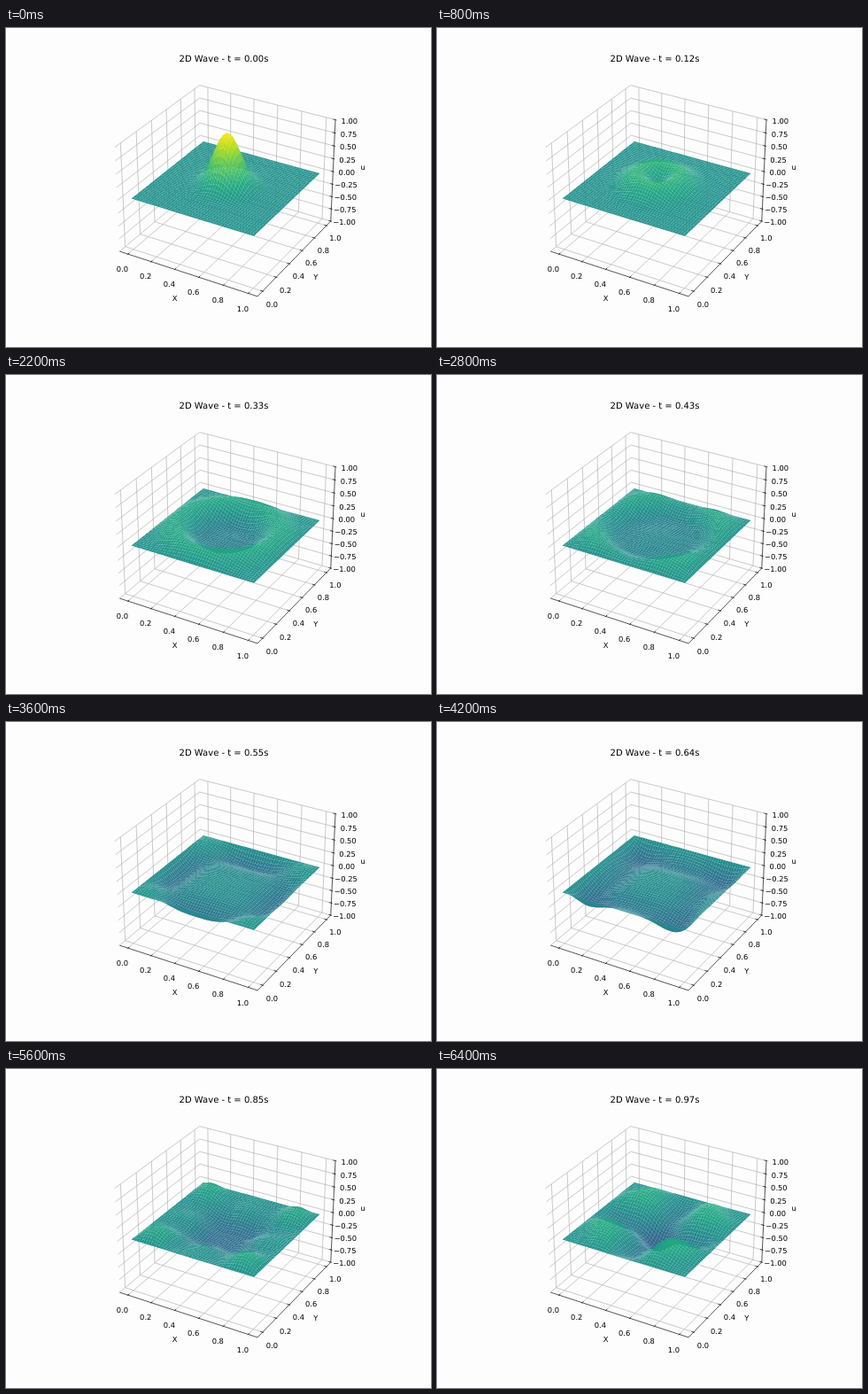
Write an HTML page with a canvas that moves like this. It is 480 by 360 pixels and loops after 6.6 s.

```html
<!DOCTYPE html>
<html lang="en">
<head>
<meta charset="utf-8">
<title>2D Wave</title>
<style>
  html, body { margin: 0; width: 100%; height: 100%; overflow: hidden; background: #fdfdfd; }
  svg, canvas { position: absolute; left: 0; top: 0; width: 480px; height: 360px; }
  text {
    font: 8.333px "DejaVu Sans", sans-serif;
    text-anchor: middle;
    text-rendering: geometricPrecision;
  }
  #title { font-size: 10px; }
  .grid { stroke: #b0b0b0; }
  .axis { stroke: #000; }
  path { fill: none; stroke-width: .667; }
</style>
</head>
<body>
<svg viewBox="0 0 480 360"><text id="title" x="246" y="38.2"></text></svg>
<canvas width="480" height="360"></canvas>
<script>
const FRAME_MS = 200, FRAMES = 33, DT = 0.0304;
const CELLS = 49, SIGMA = 0.1;
const HALF = 0.59524, HEIGHT = 0.44643, SPAN = 1.03896;

const svg = document.querySelector('svg');
const title = document.getElementById('title');
const ctx = document.querySelector('canvas').getContext('2d');

// Perspective camera: elevation 30, azimuth -60, distance 10
function project([x, y, z]) {
  const k = 1498.4 / (10 - 0.43301 * x + 0.75 * y - 0.5 * z);
  return [
    249.75 + k * (0.86603 * x + 0.5 * y),
    178.05 - k * (-0.25 * x + 0.43301 * y + 0.86603 * z)
  ];
}
const toBox = v => (v - 0.5) * SPAN;

function add(tag, attrs, text = '') {
  const el = document.createElementNS('http://www.w3.org/2000/svg', tag);
  for (const name in attrs) el.setAttribute(name, attrs[name]);
  el.textContent = text;
  svg.appendChild(el);
}
function line(cls, ...points) {
  const d = 'M' + points.map(p => project(p).map(v => v.toFixed(2)).join()).join('L');
  add('path', { class: cls, d });
}
function label(text, point, drop) {
  const [x, y] = project(point);
  add('text', { x, y: y + drop }, text);
}

function drawAxes() {
  const H = HALF, Z = HEIGHT, OUT = 0.00952, IN = 0.01905;
  const TOP = 6.3, MID = 2.3, pad = 0.079, padZ = 0.0593;
  const ticks = [0, 0.2, 0.4, 0.6, 0.8, 1];
  const levels = Array.from({ length: 9 }, (_, i) => i / 4 - 1);

  for (const v of ticks) {
    const b = toBox(v);
    line('grid', [b, -H, -Z], [b, H, -Z], [b, H, Z]);
    line('grid', [H, b, -Z], [-H, b, -Z], [-H, b, Z]);
  }
  for (const v of levels) line('grid', [-H, -H, v * Z], [-H, H, v * Z], [H, H, v * Z]);

  line('axis', [-H, -H, -Z], [H, -H, -Z]);
  line('axis', [H, -H, -Z], [H, H, -Z]);
  line('axis', [H, H, -Z], [H, H, Z]);

  for (const v of ticks) {
    const b = toBox(v), text = v.toFixed(1);
    line('axis', [b, -H - OUT, -Z], [b, -H + IN, -Z]);
    line('axis', [H + OUT, b, -Z], [H - IN, b, -Z]);
    label(text, [b, -H - pad, -Z - padZ], TOP);
    label(text, [H + pad, b, -Z - padZ], TOP);
  }
  for (const v of levels) {
    line('axis', [H + OUT, H, v * Z], [H - IN, H, v * Z]);
    label(v.toFixed(2).replace('-', '\u2212'), [H + pad, H + pad, v * Z], TOP);
  }
  label('X', [0, -0.767, -0.5753], MID);
  label('Y', [0.767, 0, -0.5753], MID);
  label('u', [0.767, 0.767, 0], MID);
}

const VIRIDIS = ['440154', '482475', '414487', '355f8d', '2a788e', '21918c',
  '22a884', '44bf70', '7ad151', 'bddf26', 'fde725']
  .map(hex => [0, 2, 4].map(i => parseInt(hex.substr(i, 2), 16)));

function colour(u) {
  const s = Math.min(Math.max((u + 1) * 5, 0), 9.9999), i = Math.floor(s);
  const rgb = VIRIDIS[i].map((c, k) => Math.round(c + (VIRIDIS[i + 1][k] - c) * (s - i)));
  return `rgb(${rgb})`;
}

// Odd sine modes of a centred Gaussian on a membrane with fixed edges
const modes = [1, 3, 5, 7, 9, 11, 13, 15].map(m => {
  const amp = 2 * SIGMA * Math.sqrt(2 * Math.PI) * Math.sin(m * Math.PI / 2)
    * Math.exp(-((m * Math.PI * SIGMA) ** 2) / 2);
  const shape = Array.from({ length: CELLS + 1 }, (_, i) => amp * Math.sin(m * Math.PI * i / CELLS));
  return { m, shape };
});

function heights(t) {
  const rows = modes.map(a => {
    const swing = modes.map(b => Math.cos(Math.PI * Math.hypot(a.m, b.m) * t));
    return a.shape.map((_, j) => modes.reduce((sum, b, k) => sum + swing[k] * b.shape[j], 0));
  });
  const at = (i, j) => modes.reduce((sum, a, k) => sum + a.shape[i] * rows[k][j], 0);
  return modes[0].shape.map((_, i) => modes[0].shape.map((_, j) => at(i, j)));
}

function drawSurface(t) {
  const u = heights(t);
  const pts = u.map((col, i) => col.map((h, j) =>
    project([toBox(i / CELLS), toBox(j / CELLS), h * HEIGHT])));
  ctx.clearRect(0, 0, 480, 360);
  // Far cells first
  for (let j = CELLS - 1; j >= 0; j--) {
    for (let i = 0; i < CELLS; i++) {
      ctx.fillStyle = colour((u[i][j] + u[i + 1][j] + u[i + 1][j + 1] + u[i][j + 1]) / 4);
      ctx.beginPath();
      ctx.moveTo(...pts[i][j]);
      ctx.lineTo(...pts[i + 1][j]);
      ctx.lineTo(...pts[i + 1][j + 1]);
      ctx.lineTo(...pts[i][j + 1]);
      ctx.fill();
    }
  }
}

let shown = -1;
function tick() {
  const step = Math.floor(performance.now() / FRAME_MS) % FRAMES;
  if (step !== shown) {
    shown = step;
    title.textContent = `2D Wave - t = ${(step * DT).toFixed(2)}s`;
    drawSurface(step * DT);
  }
  requestAnimationFrame(tick);
}

drawAxes();
tick();
</script>
</body>
</html>
```
